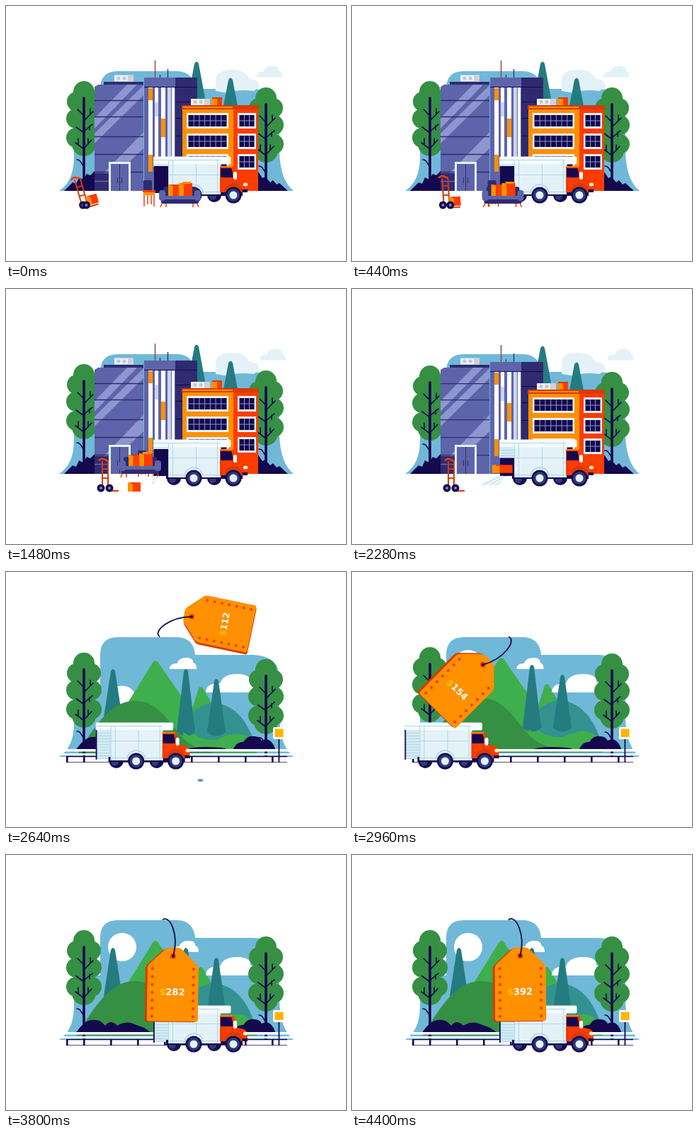
An HTML page with a canvas for the animation above (4440 ms loop, 480 by 360 pixels).

```html
<!DOCTYPE html>
<html lang="en">
<head>
<meta charset="utf-8">
<title>Moving day</title>
<style>
html, body { margin: 0; width: 100%; height: 100%; overflow: hidden; background: #fff; }
canvas { display: block; width: 480px; height: 360px; }
</style>
</head>
<body>
<canvas width="480" height="360"></canvas>
<script>
const g = document.querySelector('canvas').getContext('2d');
const LOOP = 4440, SWAP = 2440;
const navy = '#14084f', dark = '#302a70', purple = '#5e64aa', lilac = '#8d96d0', sky = '#70b8d8',
  green = '#359043', lime = '#3fae4c', pineTeal = '#247b80', hillTeal = '#339290', ice = '#e4f2f8',
  iceLine = '#aed8e6', orange = '#ff9000', red = '#ff3c00', rust = '#d93a08', white = '#fff';
let t = 0;

// Drawing helpers
const fill = (c, d) => { g.fillStyle = c; g.fill(new Path2D(d)); };
const line = (c, w, d) => { g.strokeStyle = c; g.lineWidth = w; g.stroke(new Path2D(d)); };
const rect = (c, x, y, w, h, r = 0) => {
  g.fillStyle = c; g.beginPath(); g.roundRect(x, y, w, h, r); g.fill();
};
const dot = (c, x, y, rx, ry = rx) => {
  g.fillStyle = c; g.beginPath(); g.ellipse(x, y, rx, ry, 0, 0, 7); g.fill();
};
const at = (x, y, angle, draw) => {
  g.save(); g.translate(x, y); g.rotate(angle); draw(); g.restore();
};
const clipped = (d, draw) => { g.save(); g.clip(new Path2D(d)); draw(); g.restore(); };

// Timing helpers
const span = (a, b) => Math.min(1, Math.max(0, (t - a) / (b - a)));
const smooth = u => (1 - Math.cos(Math.PI * u)) / 2;
const left3 = (a, b) => (1 - span(a, b)) ** 3;
const mix = (a, b, u) => a + (b - a) * u;
const sinkFrom = start => 180 * span(start, start + 360) ** 3;

const GROUND = 'M0 0H480V261H0Z';
const SKY = 'M75 261C91 250 96 234 96 210V185Q98 170 133 170V117Q133 92 158 92H242Q265 93 267 117H350' +
  'Q386 119 386 150V205Q387 246 406 261Z';

function tree(x, y) {
  at(x, y, 0, () => {
    for (const [dx, dy, r] of [[0, -40, 15], [-10, -26, 14], [10, -26, 14], [-11, -2, 14], [11, -2, 14],
      [-11, 25, 14], [11, 25, 14], [0, 34, 17], [0, 0, 16]]) dot(green, dx, dy, r);
    g.lineCap = 'round';
    line(navy, 3.6, `M0 -31V${261 - y}`);
    line(navy, 1.6, 'M-9 -15L0 -6M13 -12L0 1M9 -16V-8M-11 10L0 18M8 8V14M12 6L0 16M-8 26V34M-12 32L0 41' +
      'M11 28L0 40M6 26V34M-10 56Q-6 56 -4 60L0 66');
    g.lineCap = 'butt';
  });
}

function pine(x, top, half, bottom) {
  fill(pineTeal, `M${x - 3} ${top + 3}Q${x} ${top - 3} ${x + 3} ${top + 3}L${x + half} ${bottom - 6}` +
    `Q${x} ${bottom + 5} ${x - half} ${bottom - 6}Z`);
}

function cloud(c, x, y, w, h) {
  fill(c, `M${x} ${y}Q${x} ${y - h * .5} ${x + w * .28} ${y - h * .5}` +
    `Q${x + w * .34} ${y - h} ${x + w * .62} ${y - h}Q${x + w * .88} ${y - h} ${x + w * .88} ${y - h * .55}` +
    `Q${x + w} ${y - h * .5} ${x + w} ${y}Z`);
}

function roofUnit(x, y) {
  rect(ice, x, y, 27, 9);
  rect('#d3cfd6', x + 19, y, 8, 9);
  dot('#c9c3cc', x + 6, y + 4.5, 2.5);
  dot('#c9c3cc', x + 14, y + 4.5, 2.5);
}

function windowBlock(x, y, w, cols) {
  rect(ice, x, y, w, 22);
  rect(navy, x + 2.5, y + 3, w - 5, 16);
  const step = (w - 5) / cols;
  for (let i = 1; i < cols; i++) rect('#8f98c8', x + 2 + i * step, y + 3, 1, 16);
  rect('#8f98c8', x + 2.5, y + 10.5, w - 5, 1);
}

function tower() {
  line('#8c4a4a', 1.5, 'M210.5 77V102');
  line(dark, 1.3, 'M217.5 97V102M228.5 89V102');
  rect(purple, 195, 101, 45, 160);
  rect(dark, 239, 101, 31, 160);
  line(navy, 1, 'M195 114.5H270M239 135.5H270M239 158.5H270M239 183.5H270');
  for (const [x, w] of [[201, 6], [210, 5], [219, 6], [228, 5], [234, 4]]) rect(x == 228 ? '#c9d4ee' : white, x, 115, w, 100);
  rect('#c9d4ee', 210, 136, 5, 20);
  rect(orange, 201, 116, 6, 17);
  rect(orange, 219, 159, 6, 26);
  rect(orange, 201, 210, 6, 24);
}

function office() {
  roofUnit(153, 97.5);
  rect(dark, 138, 107, 56, 8);
  const face = 'M125 114L130 111H194V261H125Z';
  fill(purple, face);
  clipped(face, () => {
    fill(lilac, 'M125 158L171 111H185L125 173ZM125 180L194 112V126L125 194ZM132 242L194 178V201L151 242Z');
    line(dark, 1.3, 'M125 133.5H194M125 156.5H194M125 184.5H194M125 209.5H194M125 234.5H194');
    rect(dark, 125, 236, 20, 25);
    line(purple, 1.5, 'M125 247.5H145');
  });
  rect(ice, 145, 220, 31, 41);
  rect(purple, 148, 223, 25, 38);
  line(dark, 1, 'M160.5 223V261M157.5 242V250M163.5 242V250');
}

function flats() {
  roofUnit(261, 131);
  rect(orange, 290, 131, 8, 10);
  rect(red, 298, 131, 7, 10);
  rect(rust, 291, 129, 14, 2);
  rect(orange, 249, 141, 73, 120);
  rect(red, 321, 141, 35, 120);
  rect(rust, 248, 140, 109, 6);
  rect(orange, 250, 142, 70, 2);
  for (const y of [151, 180, 209]) {
    windowBlock(255, y, 59, 7);
    windowBlock(327, y, 26, 3);
  }
}

function city() {
  clipped(GROUND, () => {
    at(0, sinkFrom(2200), 0, () => { tower(); flats(); });
    at(0, sinkFrom(2250), 0, office);
  });
}

function nature() {
  const rise = 140 * left3(2440, 2750), hills = rise * .65, drift = (t - 2640) / 680;
  clipped(SKY, () => {
    dot(white, 164, 130 + 130 * left3(2560, 2860), 20);
    cloud(white, 231 + 3 * Math.min(1, drift), 137, 38, 16);
    at(0, hills, 0, () => {
      fill(lime, 'M160 200L207 124Q211 118 215 124L262 192L272 160Q275 156 278 160L310 215V250H160Z');
    });
    cloud(white, 282, 170, 72, 26);
    at(0, hills, 0, () => {
      fill(hillTeal, 'M258 250V206C270 170 335 165 354 250Z');
      fill(lime, 'M238 195Q258 234 300 234V255H238Z');
    });
    at(0, rise, 0, () => {
      pine(151, 131, 13, 205);
      pine(254, 131, 13, 226);
      pine(297, 145, 13, 226);
    });
    at(0, hills, 0, () => {
      fill(lime, 'M250 222Q266 234 298 233Q334 213 354 241V255H250Z');
      fill(green, 'M100 255C130 205 150 178 183 178C222 178 236 224 262 240Q274 247 292 251V255Z');
    });
    fill(navy, 'M98 252Q110 234 121 233Q133 231 140 241Q148 231 157 241Q169 234 179 238L195 244L207 252Z' +
      'M320 252Q325 239 335 240Q341 230 351 232Q358 232 361 238Q374 231 381 252ZM249 252Q270 244 310 249V252Z');
  });
}

function rail() {
  rect(white, 80, 250, 322, 3.6);
  rect(white, 77, 256, 328, 3);
  line(navy, 1.4, 'M85 260.5H397');
  line('#5a4a86', 1, 'M86 268.5H397');
  for (let x = 86; x < 390; x += x < 100 ? 24 : 38) rect(navy, x - 1, 260, 2.6, 9);
  rect(navy, 384.5, 234, 1.8, 35);
  rect(white, 377, 219, 17, 17, 2);
  rect('#ffb400', 379.5, 221.5, 12, 11.5);
}

function wheel(x) {
  dot(navy, x, 267, 11.5);
  dot('#2e3a78', x, 267, 9);
  dot(ice, x, 267, 5.5);
}

function truckBack() {
  for (const x of [237, 294]) { dot(navy, x, 267, 10); dot('#2e3a78', x - 2, 269, 5); }
  rect(navy, 209, 218, 22, 46);
  const door = mix(9, 47, smooth(span(2180, 2440)));
  g.save();
  g.beginPath(); g.rect(208, 217, 22, door); g.clip();
  rect('#d3eaf3', 208, 217, 22, 48);
  for (let y = 223; y < 266; y += 4) rect(iceLine, 210, y, 20, 1);
  g.restore();
  line(iceLine, 1, 'M208.5 217V227');
  if (t > SWAP) rect(navy, 208, 222, 1.8, 43);
}

function truckFront() {
  rect(navy, 226, 261, 108, 7);
  rect(ice, 229, 217, 74, 49);
  rect('#f5fbfe', 208, 212.5, 109.5, 11, 2);
  line(iceLine, 1, 'M208 217.5H302M229.5 217V266M235.5 217V266M298.5 217V266M268.5 223V262M229 238.5H302M229 262.5H302');
  fill(red, 'M302 226H320Q324 228 324 243L336 246Q341 248 341 259V263H302Z');
  rect(orange, 302, 226, 18, 1.5);
  fill(navy, 'M303 229H318Q320 232 320 242H303Z');
  line(rust, 1.2, 'M304.5 243V262M320 243V254M324 251H340');
  rect(white, 321, 234, 5, 11, 2);
  rect(navy, 329, 259, 12, 4);
  dot('#fff1c9', 338, 252, 3.2, 2.5);
  line(iceLine, 1.5, 'M252 265A13 13 0 0 1 278 265');
  fill(rust, 'M308 263A13 13 0 0 1 334 263Z');
  wheel(265);
  wheel(321);
}

function parcel(x, y, w, h) {
  rect(orange, x, y, w * .38, h);
  rect(red, x + w * .38, y, w * .62, h);
  rect(rust, x + w * .2, y, w * .35, 1.5);
}

function chair() {
  rect(dark, 194, 246, 12, 15, 2);
  rect(red, 193, 260, 18, 3);
  rect(orange, 194, 263, 16, 4);
  line(rust, 1.4, 'M195 267V283M200 267V280M205 267V280M209 267V283');
}

function sofa() {
  rect(dark, 170, 255, 47, 16, 4);
  parcel(177, 252, 18, 18);
  parcel(192, 250, 19, 19);
  rect(orange, 197, 248, 12, 3);
  rect(purple, 168, 268, 51, 6, 2);
  rect(dark, 167, 273, 53, 6, 2);
  rect(purple, 164, 260, 9, 15, 4);
  rect(purple, 214, 260, 9, 15, 4);
  line(red, 1.5, 'M168 279L166 284M174 279V284M212 279V284M218 279L220 284');
}

function furniture() {
  const slide = 1 - smooth(span(0, 760)), lift = smooth(span(1340, 1480)), load = smooth(span(1490, 1900));
  const dx = -4 * lift + 72 * load, dy = -18 * lift - 2 * load;
  at(dx - 4 * (1 - slide), dy, 0, chair);
  at(dx + 52 * slide, dy, 0, sofa);
}

function looseBox() {
  if (t < 600) return;
  const move = smooth(span(1050, 1400)), load = span(1900, 2420) ** 2;
  parcel(mix(148, 172, move) + 48 * load, mix(248, 273, move) - 46 * Math.min(.55, load),
    18 + 20 * Math.min(.75, load), mix(17, 13, move) - 3 * load);
}

function ramp() {
  const out = smooth(span(1380, 1660)) * (1 - span(2300, 2400));
  if (!out) return;
  const x = mix(217, 181, out);
  clipped(`M${x} 262H230V280H${x}Z`, () => {
    fill('#cfe8f2', 'M181 277L207 264H218L206 277Z');
    line(white, 1.5, 'M190 277L213 264M199 277L218 265');
  });
}

function dolly() {
  const u = smooth(span(0, 640)), x = mix(111, 140, u);
  at(x, 280, mix(-.28, 0, u), () => {
    line(rust, 2, 'M-4 1V-37M4 1V-37M-4 -26H4M-4 -13H4');
    line(red, 2.6, 'M-9 -38Q-5 -42 0 -39L4 -37');
    if (t < 600) parcel(4, -10, 16, 13);
    line(rust, 2, 'M4 5H19');
  });
  for (const dx of [-6, 6]) {
    const wx = x + dx * mix(.4, 1, u);
    dot(navy, wx, 281, 5.5);
    dot('#7a86b8', wx, 281, 2);
  }
}

function tag() {
  const s = t - 2500;
  if (s < 0) return;
  const swing = -186 * Math.PI / 180 * Math.exp(-.003 * s) * Math.cos(.0062 * s);
  const turn = swing * 1.34, sin = Math.sin(turn), cos = Math.cos(turn);
  const x = mix(217, 221, span(2640, 2900)), y = 91.5, size = mix(.92, 1, span(2560, 2900));
  at(x + 16 * cos - 51 * sin, y + 16 * sin + 51 * cos, swing, () => {
    g.scale(size, size);
    const body = 'M-12 -9Q-8 -12 -4 -12H6Q10 -12 13 -9L34 12Q36 14 36 18V89Q36 92 33 92H-33Q-36 92 -36 89V18Q-36 14 -34 12Z';
    at(-3, 1, 0, () => fill(rust, body));
    fill(orange, body);
    for (let i = 0; i < 7; i++) for (const dx of [-29, 29]) dot('#f23d08', dx, 18 + i * 11.2, 2.1);
    dot(red, 0, 0, 4);
    dot(navy, 0, 0, 2);
    const n = Math.max(0, t - 2640);
    const value = Math.round(112 + .1227 * n + 2.067e-5 * n * n);
    g.font = 'bold 13px "DejaVu Sans", sans-serif';
    g.fillStyle = '#ffc000';
    g.fillText('$', -19, 55);
    g.fillStyle = white;
    g.fillText(value, -10, 55);
  });
  at(x, y, turn, () => line(navy, 1.8, 'M0 0C10 -8 24 20 16 51'));
}

function draw() {
  const country = t >= SWAP;
  const sink = sinkFrom(2200);
  g.fillStyle = white;
  g.fillRect(0, 0, 480, 360);
  fill(sky, SKY);
  if (country) nature();
  else {
    cloud(ice, 353 + t * .0033, 100.5, 37, 16);
    fill(ice, 'M296 120V103Q298 90 318 90Q337 89 344 103Q357 103 358 114L350 120Q325 117 314 123Z');
    pine(269, 78.5 + sink, 12, 136 + sink);
    pine(317, 101.5 + sink, 10, 147 + sink);
  }
  // Trees dip with the city and grow back with the hills
  const dip = country ? 53 * left3(SWAP, 2865) : sink;
  clipped(GROUND, () => { tree(110, 161 + dip); tree(367, 170 + dip); });
  if (!country) {
    fill(navy, 'M82 261L94 249L99 251L103 242L109 245L114 237L119 239L125 233V261Z' +
      'M398 261L386 250L382 252L377 246L373 249L366 241L362 243L356 234V261Z');
  }
  if (t < 2610) city();
  if (country) rail();

  const back = smooth(span(2350, 2880)) - smooth(span(2880, 3430));
  at(-141 * back, 0, 0, () => {
    truckBack();
    if (!country) {
      if (t > 1480) furniture();
      if (t > 1900) looseBox();
    }
    truckFront();
  });
  if (!country) {
    ramp();
    if (t <= 1900) looseBox();
    if (t <= 1480) furniture();
    dolly();
  } else if (t > 2560 && t < 2880) {
    dot('#7a8fbd', 274.5, 294, 4, 2);
  }
  tag();
}

function tick(now) {
  t = now % LOOP;
  draw();
  requestAnimationFrame(tick);
}
requestAnimationFrame(tick);
</script>
</body>
</html>
```
